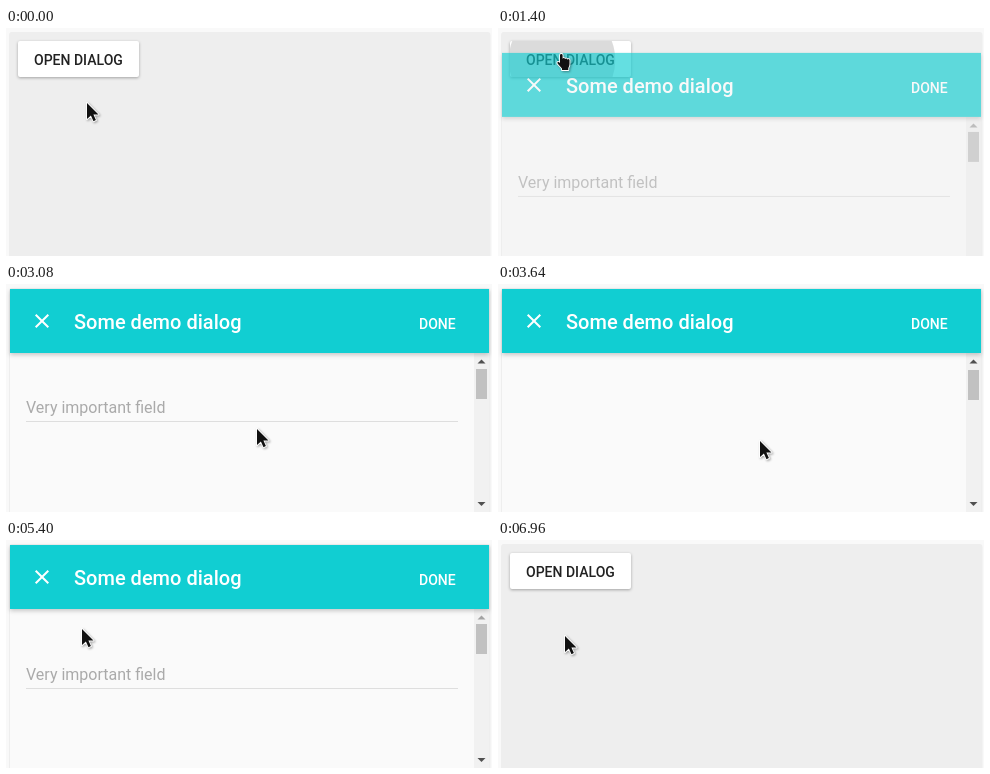
Write an HTML page that moves like this. It is 486x228 px and loops after 7000 ms.

```html
<!DOCTYPE html>
<html lang="en">
<head>
<meta charset="utf-8">
<title>Full screen dialog</title>
<style>
  html, body { margin: 0; width: 100%; height: 100%; overflow: hidden; background: #f9f9f9; }
  svg { display: block; width: 486px; height: 228px; }
  text { font: 500 14px Roboto, "Open Sans", sans-serif; }
  #button { filter: drop-shadow(0 1px 1.5px rgba(0, 0, 0, .32)); }
  #header { filter: drop-shadow(0 2px 2px rgba(0, 0, 0, .2)); }
  #cursor { filter: drop-shadow(1px 1.5px 1px rgba(0, 0, 0, .35)); }
  #cursor path { fill: #111; stroke: #fff; stroke-width: 1.8px; paint-order: stroke; stroke-linejoin: round; }
  .title { font-size: 20px; }
  .field { font-size: 16px; font-weight: 400; }
</style>
</head>
<body>
<svg viewBox="0 0 486 228">
  <defs>
    <clipPath id="buttonClip"><rect x="12" y="13" width="121" height="36" rx="2"/></clipPath>
    <clipPath id="bodyClip"><rect x="4" y="69" width="464" height="159"/></clipPath>
  </defs>

  <rect x="3" y="4" width="481.5" height="240" rx="3" fill="#eee"/>
  <rect id="button" x="12" y="13" width="121" height="36" rx="2" fill="#fff"/>
  <g clip-path="url(#buttonClip)"><circle id="openRipple" cx="64" cy="32"/></g>
  <text x="28" y="37" fill="#212121">OPEN DIALOG</text>

  <g id="dialog">
    <rect x="4" y="5" width="479" height="223" fill="#fafafa"/>
    <g clip-path="url(#bodyClip)">
      <g id="content">
        <text class="field" x="20" y="140" fill="#aaa">Very important field</text>
        <rect x="20" y="148" width="432" height="1" fill="#dedede"/>
      </g>
    </g>
    <rect x="468" y="69" width="15" height="159" fill="#f1f1f1"/>
    <path id="up" d="M471.5 79.5l4-4 4 4z"/>
    <path d="M471.5 218l4 4 4-4z" fill="#505050"/>
    <rect id="thumb" x="470" y="84" width="11" height="30" fill="#c1c1c1"/>
    <rect id="header" x="4" y="5" width="479" height="64" fill="#11ced2"/>
    <circle id="closeRipple" cx="36" cy="37"/>
    <path d="M29.7 30.7l12.6 12.6M42.3 30.7L29.7 43.3" stroke="#fff" stroke-width="2"/>
    <text class="title" x="68" y="45" fill="#fff">Some demo dialog</text>
    <text x="413" y="45" fill="#fff">DONE</text>
  </g>

  <g id="cursor">
    <path id="arrow" d="M0 0V16L3.9 12.5 6.5 18.2 8.9 17.1 6.4 11.6H11.5Z"/>
    <path id="hand" d="M-1 1.3a1.3 1.3 0 0 1 2.6 0V5.3a1.2 1.2 0 0 1 2.4 0 1.2 1.2 0 0 1 2.3.6 1.1 1.1 0 0 1 2.2.8V10q0 2-1.2 4v2H1v-1.5L-3.4 9.6q-.7-1.7.8-1.8L-1 9Z"/>
  </g>
</svg>
<script>
  const LOOP = 7000, OPEN = 1288, CLOSE = 5958, SLIDE = 300, DROP = 56.5;

  // [time, x, y]
  const pointer = [
    [120, 81, 75], [640, 63, 26], [1640, 63, 26], [2160, 66, 66], [2300, 66, 66],
    [2880, 207, 97], [3160, 262, 157], [3700, 262, 157], [4340, 170, 211],
    [5040, 170, 211], [5620, 32, 31], [6140, 32, 31], [6500, 67, 96]
  ];
  // [time, offset]
  const scroll = [
    [3000, 0], [3400, 100], [3680, 100], [3960, 200], [4380, 200], [4500, 100], [4674, 0]
  ];
  const handTimes = [[420, 1660], [5560, 6260]];

  const $ = id => document.getElementById(id);
  const clamp = v => Math.min(1, Math.max(0, v));
  const span = (t, start, length) => clamp((t - start) / length);
  const smooth = p => p * p * (3 - 2 * p);

  function track(keys, t) {
    const i = keys.findIndex(k => k[0] > t);
    if (i === 0) return keys[0].slice(1);
    if (i < 0) return keys[keys.length - 1].slice(1);
    const a = keys[i - 1], b = keys[i];
    const p = smooth(span(t, a[0], b[0] - a[0]));
    return a.slice(1).map((v, n) => v + (b[n + 1] - v) * p);
  }

  // cubic-bezier(.25, .1, .25, 1)
  function ease(x) {
    const curve = (s, a, b) => 3 * a * s * (1 - s) ** 2 + 3 * b * s * s * (1 - s) + s ** 3;
    let lo = 0, hi = 1;
    for (let i = 0; i < 24; i++) {
      const mid = (lo + hi) / 2;
      if (curve(mid, .25, .25) < x) lo = mid; else hi = mid;
    }
    return curve(lo, .1, 1);
  }

  const move = (el, x, y) => el.setAttribute("transform", `translate(${x} ${y})`);

  function ripple(el, radius, alpha) {
    el.setAttribute("r", radius);
    el.setAttribute("fill-opacity", alpha);
  }

  function draw(t) {
    const shown = t < CLOSE ? ease(span(t, OPEN, SLIDE)) : 1 - ease(span(t, CLOSE, SLIDE));
    move($("dialog"), 0, DROP * (1 - shown));
    $("dialog").setAttribute("opacity", shown);

    const [offset] = track(scroll, t);
    move($("content"), 0, -Math.round(offset));
    move($("thumb"), 0, Math.ceil(offset * .02));
    $("up").setAttribute("fill", offset > 0 ? "#505050" : "#a3a3a3");

    ripple($("openRipple"), 80 * span(t, 1160, 362), .14 * (1 - span(t, 1420, 350)));
    ripple($("closeRipple"), 15.5 * span(t, 5760, 200), .16 * (1 - span(t, 6020, 250)));

    const [x, y] = track(pointer, t);
    const isHand = handTimes.some(([from, to]) => t >= from && t < to);
    move($("cursor"), Math.round(x), Math.round(y));
    $("hand").style.display = isHand ? "" : "none";
    $("arrow").style.display = isHand ? "none" : "";
  }

  const start = performance.now();
  function frame() {
    draw((performance.now() - start) % LOOP);
    requestAnimationFrame(frame);
  }
  frame();
</script>
</body>
</html>
```
